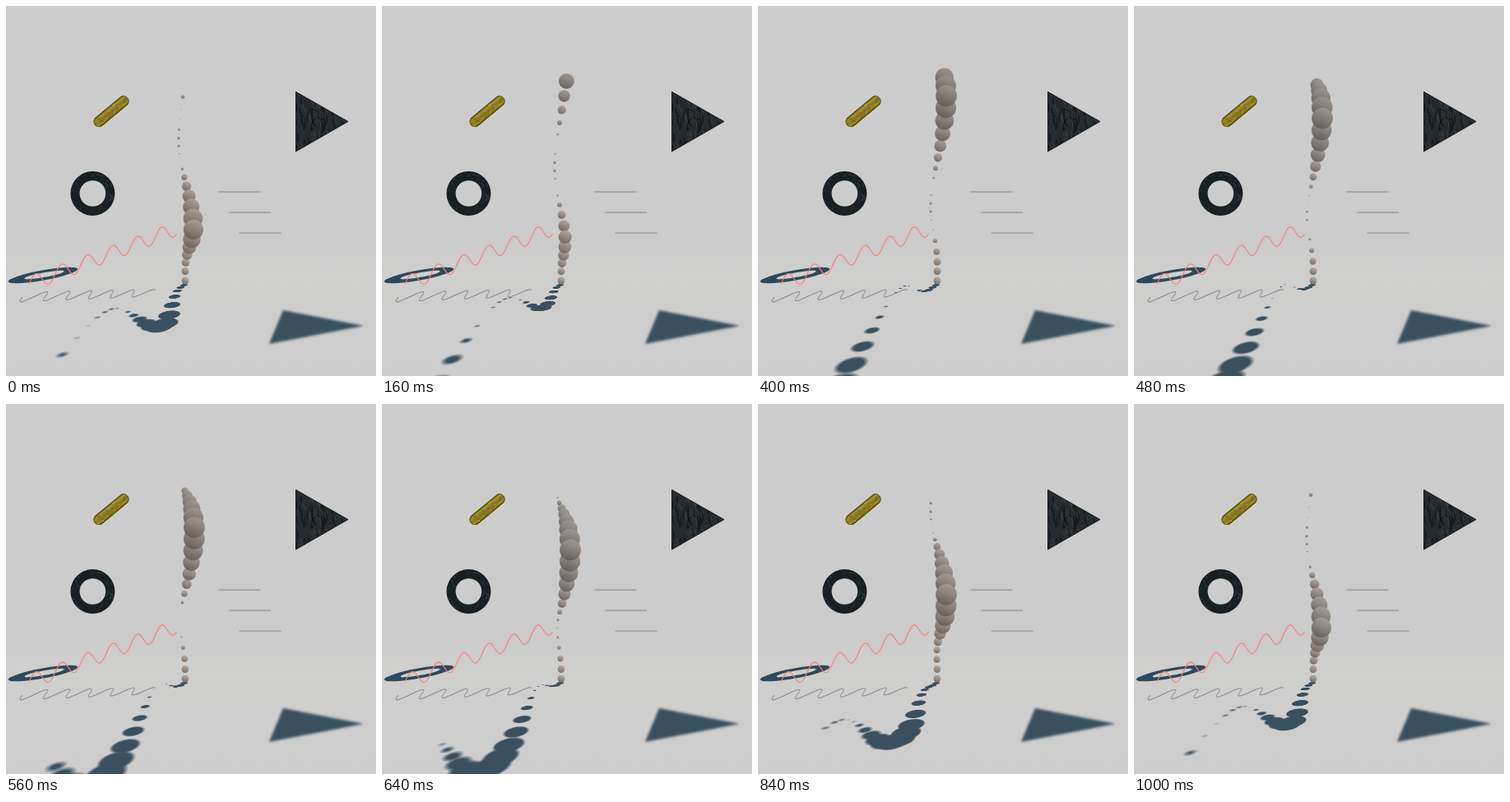
An HTML page with a canvas for the animation above (1040 ms loop, 450x450 px).

```html
<!DOCTYPE html>
<html lang="en">
<head>
<meta charset="utf-8">
<title>Sphere wave</title>
<style>
html, body { margin: 0; width: 100%; height: 100%; overflow: hidden; background: #cdcdcd; }
canvas { display: block; width: 450px; height: 450px; }
</style>
</head>
<body>
<canvas id="stage" width="450" height="450"></canvas>
<script>
const SIZE = 450, MID = 225, TAU = Math.PI * 2;
const STEP = 40, STEPS = 26, CYCLE = 25;
const COUNT = 21, FLOOR = 113.5, DEPTH = 500;
const SUN = { x: -0.337, z: 0.00206 };
const SHADOW = '#3a505f';
const ctx = document.getElementById('stage').getContext('2d');

function layer(paint) {
  const c = document.createElement('canvas');
  c.width = c.height = SIZE;
  paint(c.getContext('2d'));
  return c;
}

function seeded(s) {
  return () => (s = (s * 16807) % 2147483647) / 2147483647;
}

function poly(g, pts) {
  g.beginPath();
  pts.forEach(([x, y]) => g.lineTo(x, y));
  g.closePath();
}

// A sine running along a receding axis, displaced along (dx, dy).
function wave(g, [x0, y0], [x1, y1], dx, dy, taper, color, width) {
  g.beginPath();
  for (let i = 0; i <= 240; i++) {
    const t = i / 240, along = t * (1.055 - 0.055 * t);
    const s = Math.sin(t * TAU * 5.88) * (1 - taper * t);
    g.lineTo(x0 + (x1 - x0) * along + dx * s, y0 + (y1 - y0) * along + dy * s);
  }
  g.strokeStyle = color;
  g.lineWidth = width;
  g.stroke();
}

function paintFloor(g) {
  const sky = g.createLinearGradient(0, 0, 0, SIZE);
  [[0, '#cdcdcd'], [0.64, '#cccccc'], [0.72, '#cfcfce'], [1, '#cdcdcd']]
    .forEach(([o, c]) => sky.addColorStop(o, c));
  g.fillStyle = sky;
  g.fillRect(0, 0, SIZE, SIZE);

  g.filter = 'blur(0.7px)';
  g.fillStyle = '#30495a';
  g.beginPath();
  g.ellipse(45, 327.5, 43, 6.2, -0.18, 0, TAU);
  g.ellipse(46.5, 327, 24.5, 2.9, -0.18, 0, TAU);
  g.fill('evenodd');

  g.filter = 'blur(1.6px)';
  g.fillStyle = SHADOW;
  poly(g, [[337, 370], [435, 389], [320, 411]]);
  g.fill();
  g.filter = 'none';

  wave(g, [20, 354], [177, 349], -9, 6.2, 0.3, '#74787a', 0.9);
}

function paintRing(g) {
  const rnd = seeded(41);
  g.save();
  g.beginPath();
  g.arc(105.4, 228, 27, 0, TAU);
  g.arc(105.4, 228, 15.8, 0, TAU, true);
  g.clip();
  g.fillStyle = '#182023';
  g.fillRect(70, 195, 70, 70);
  g.lineWidth = 0.7;
  for (let i = 0; i < 18; i++) {
    const a = rnd() * TAU, r = 15 + rnd() * 11;
    const x = 105 + r * Math.cos(a), y = 228 + r * Math.sin(a);
    g.strokeStyle = `rgba(130,142,146,${0.2 + rnd() * 0.35})`;
    g.beginPath();
    g.moveTo(x, y);
    g.quadraticCurveTo(x + rnd() * 8 - 4, y + rnd() * 8 - 4, x + rnd() * 18 - 9, y + rnd() * 14 - 7);
    g.stroke();
  }
  g.restore();
}

function paintCapsule(g) {
  const rnd = seeded(77);
  g.save();
  g.translate(128, 128.2);
  g.rotate(-0.69);
  g.beginPath();
  g.roundRect(-26, -6.5, 52, 13, 6.5);
  g.clip();
  const gold = g.createLinearGradient(0, -6.5, 0, 6.5);
  [[0, '#5d510f'], [0.22, '#a8952c'], [0.5, '#7f7024'], [0.8, '#9c8923'], [1, '#453b09']]
    .forEach(([o, c]) => gold.addColorStop(o, c));
  g.fillStyle = gold;
  g.fillRect(-26, -7, 52, 14);
  for (let i = 0; i < 46; i++) {
    g.fillStyle = rnd() < 0.6 ? 'rgba(60,50,8,.4)' : 'rgba(205,186,70,.4)';
    g.fillRect(rnd() * 52 - 26, rnd() * 11 - 5.5, 1 + rnd() * 3, 1);
  }
  g.strokeStyle = '#544809';
  g.lineWidth = 1.4;
  g.beginPath();
  g.roundRect(-26, -6.5, 52, 13, 6.5);
  g.stroke();
  g.restore();
}

function paintTriangle(g) {
  const rnd = seeded(9);
  g.save();
  poly(g, [[352.3, 104], [416.3, 140.5], [352.3, 177.3]]);
  g.clip();
  g.fillStyle = '#252b2e';
  g.fillRect(350, 100, 70, 80);
  for (let i = 0; i < 110; i++) {
    const x = 352 + rnd() * 64, y = 104 + rnd() * 72, h = 4 + rnd() * 9;
    g.strokeStyle = rnd() < 0.5 ? 'rgba(8,11,13,.65)' : 'rgba(76,84,86,.4)';
    g.lineWidth = 0.8 + rnd() * 1.2;
    g.beginPath();
    g.moveTo(x, y);
    g.quadraticCurveTo(x + rnd() * 6 - 3, y + h / 2, x + rnd() * 4 - 1, y + h);
    g.stroke();
  }
  g.restore();
  g.strokeStyle = '#14181a';
  g.lineWidth = 0.8;
  poly(g, [[352.5, 104.4], [416, 140.5], [352.5, 177]]);
  g.stroke();
}

function paintObjects(g) {
  wave(g, [28, 338], [207.5, 271], 0, -9.2, 0.05, '#ff7c7a', 1.1);
  paintRing(g);
  paintCapsule(g);
  paintTriangle(g);
  g.fillStyle = '#8b8b8b';
  [[258.5, 225.5], [271, 250.5], [283.7, 275.5]].forEach(([x, y]) => g.fillRect(x, y, 51, 1.1));
}

const floorLayer = layer(paintFloor);
const objectLayer = layer(paintObjects);

// Sphere n, counted from the top; z is 1 at rest, smaller is nearer.
function sphere(n, phase) {
  const up = COUNT - 1 - n;
  const u = Math.min(1, Math.max(0, (up - 0.7) / 6.3));
  const swing = u * u * (3 - 2 * u) * Math.cos(TAU * (phase - 0.303 - 0.0475 * n));
  return {
    x: -7 + 10.4 * swing,
    y: 109 - 11.47 * up,
    z: 1 - 0.158 * swing,
    r: Math.abs(4.5 + 6.4 * swing)
  };
}

// Penumbra widens with height, so small high spheres leave only a faint smudge.
function drawShadow(b) {
  const h = FLOOR - b.y;
  const x = b.x + SUN.x * h, z = b.z - SUN.z * h;
  if (z < 0.2) return;
  const lean = SUN.z * DEPTH;
  const soft = h * 0.009;
  const outer = b.r + soft;
  ctx.save();
  ctx.globalAlpha = Math.min(1, b.r / soft);
  ctx.transform(1 / z, 0, -x / (z * z * DEPTH), -FLOOR / (z * z * DEPTH), MID + x / z, MID + FLOOR / z);
  ctx.rotate(Math.atan2(-lean, SUN.x));
  ctx.scale(Math.hypot(1, SUN.x, lean), 1);
  const fade = ctx.createRadialGradient(0, 0, Math.max(0, b.r - soft), 0, 0, outer);
  fade.addColorStop(0, SHADOW);
  fade.addColorStop(1, 'rgba(58,80,95,0)');
  ctx.fillStyle = fade;
  ctx.beginPath();
  ctx.arc(0, 0, outer, 0, TAU);
  ctx.fill();
  ctx.restore();
}

// Lit from behind and above: a bright upper rim over a grey face.
function drawSphere(b) {
  const x = MID + b.x / b.z, y = MID + b.y / b.z, r = b.r / b.z;
  const warm = Math.min(1, Math.max(0, (y - 80) / 220));
  const dim = Math.max(0, 1 - b.z) * 90;
  const tone = (l, w) => `rgb(${l - dim + w * 14 * warm},${l - dim - 5 + w * 8 * warm},${l - dim - 9 + w * 4 * warm})`;
  const skin = ctx.createLinearGradient(x + r * 0.35, y - r * 0.94, x - r * 0.35, y + r * 0.94);
  skin.addColorStop(0, tone(164, 1.4));
  skin.addColorStop(0.4, tone(146, 1));
  skin.addColorStop(1, tone(112, 0.4));
  ctx.fillStyle = skin;
  ctx.beginPath();
  ctx.arc(x, y, r, 0, TAU);
  ctx.fill();
}

function draw(phase) {
  const balls = Array.from({ length: COUNT }, (_, n) => sphere(n, phase));
  ctx.drawImage(floorLayer, 0, 0);
  balls.forEach(drawShadow);
  ctx.drawImage(objectLayer, 0, 0);
  balls.sort((a, b) => b.z - a.z).forEach(drawSphere);
}

const start = performance.now();
function tick() {
  const step = Math.floor((performance.now() - start) / STEP) % STEPS;
  draw(step / CYCLE);
  requestAnimationFrame(tick);
}
tick();
</script>
</body>
</html>
```
